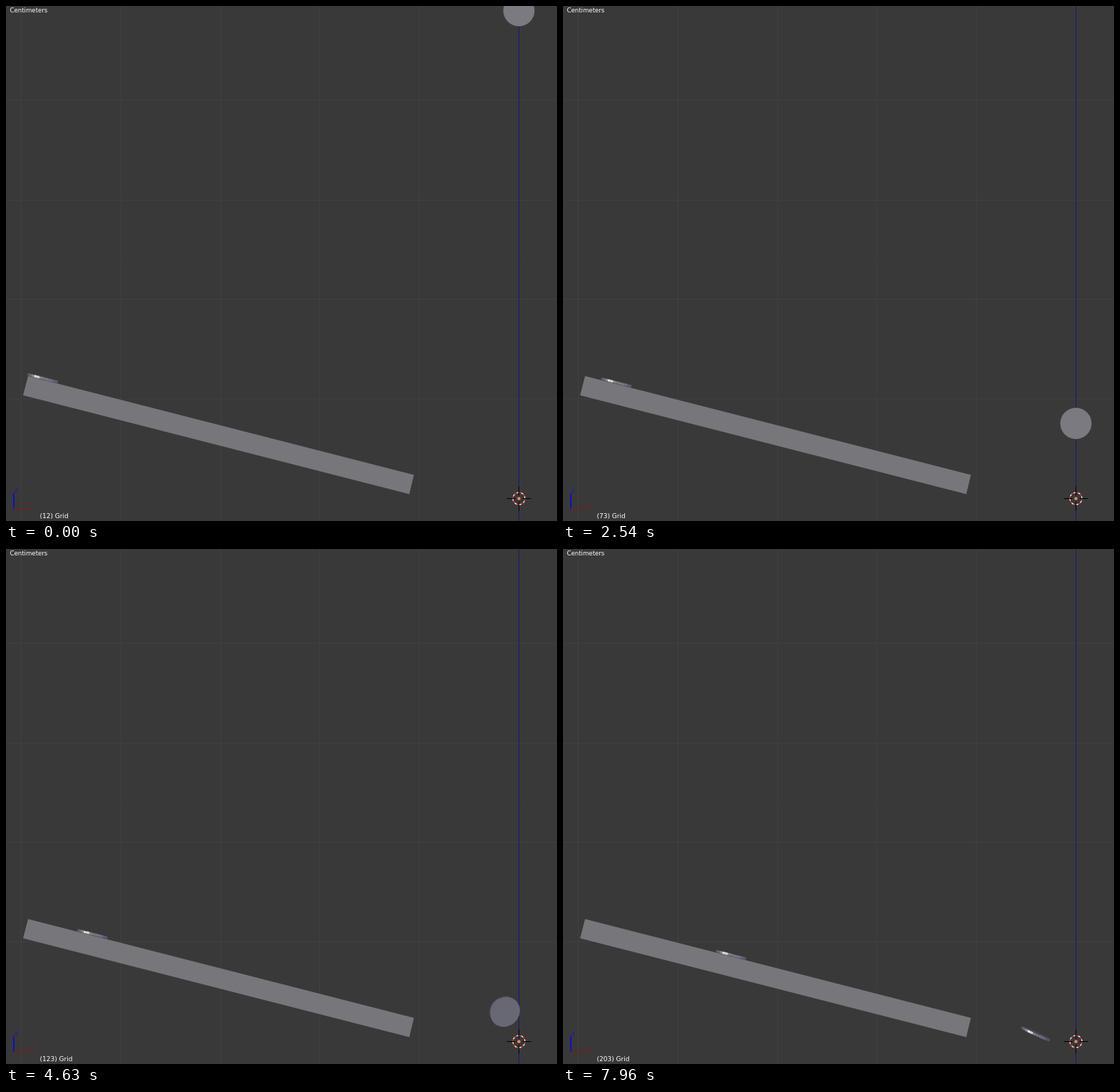
These frames come from a looping animation (774x723 px, 8 s). An HTML page with a canvas:

```html
<!DOCTYPE html>
<html lang="en">
<head>
<meta charset="utf-8">
<title>Falling coin</title>
<style>
  html, body { margin: 0; width: 100%; height: 100%; overflow: hidden; background: #393939; }
  canvas { display: block; }
</style>
</head>
<body>
<canvas id="stage" width="774" height="723"></canvas>
<script>
const ctx = document.getElementById('stage').getContext('2d');
const LOOP = 8000, STEP = 1000 / 24, FIRST = 12;
const RADIUS = 22, THICK = 3.4, FLOOR = 690.7, SEGMENTS = 32;
const IMPACT = 78, SECOND_IMPACT = 128, ROLL = 142;

// Vectors are [right, up, toward the viewer].
const dot = (a, b) => a[0] * b[0] + a[1] * b[1] + a[2] * b[2];
const cross = (a, b) => [
  a[1] * b[2] - a[2] * b[1],
  a[2] * b[0] - a[0] * b[2],
  a[0] * b[1] - a[1] * b[0]
];
const scale = (a, k) => a.map(v => v * k);
const add = (...vs) => [0, 1, 2].map(i => vs.reduce((sum, v) => sum + v[i], 0));
const unit = a => scale(a, 1 / Math.hypot(...a));
const mix = (a, b, k) => a + (b - a) * k;
const clamp01 = v => Math.min(1, Math.max(0, v));

function lookup(keys, x, warp = v => v) {
  let i = 1;
  while (i < keys.length - 1 && x > keys[i][0]) i++;
  const [x0, y0] = keys[i - 1], [x1, y1] = keys[i];
  return mix(y0, y1, clamp01((warp(x) - warp(x0)) / (warp(x1) - warp(x0))));
}

const HALF = unit([-0.37, 0.125, 0.92]);
function shade(n) {
  const key = Math.max(0, dot(n, [-55, 40, 98]));
  const fill = Math.max(0, dot(n, [0.78, 0.1, 0.15]));
  const shine = 130 * Math.pow(Math.max(0, dot(n, HALF)), 40);
  const grey = Math.round(key + shine + fill * 130);
  return `rgb(${grey},${grey},${Math.round(key + shine + fill * 168)})`;
}

function polygon(points, color) {
  ctx.beginPath();
  points.forEach(p => ctx.lineTo(p[0], p[1]));
  ctx.closePath();
  ctx.fillStyle = color;
  ctx.fill();
}

function line(x1, y1, x2, y2, color, width = 1) {
  ctx.beginPath();
  ctx.moveTo(x1, y1);
  ctx.lineTo(x2, y2);
  ctx.strokeStyle = color;
  ctx.lineWidth = width;
  ctx.stroke();
}

function text(value, x, y, size, color = '#fff') {
  ctx.font = `${size}px "DejaVu Sans", sans-serif`;
  ctx.fillStyle = color;
  ctx.fillText(value, x, y);
}

function drawCoin(cx, cy, normal) {
  const n = normal[2] < 0 ? scale(normal, -1) : normal;
  const u = unit(cross(Math.abs(n[1]) > 0.9 ? [1, 0, 0] : [0, 1, 0], n));
  const v = cross(n, u);
  const radial = i => {
    const a = i / SEGMENTS * Math.PI * 2;
    return add(scale(u, Math.cos(a)), scale(v, Math.sin(a)));
  };
  const point = (i, side) => {
    const p = add(scale(radial(i), RADIUS), scale(n, side * THICK / 2));
    return [cx + p[0], cy - p[1]];
  };
  for (let i = 0; i < SEGMENTS; i++) {
    const side = radial(i + 0.5);
    if (side[2] > 0) {
      polygon([point(i, -1), point(i + 1, -1), point(i + 1, 1), point(i, 1)], shade(side));
    }
  }
  polygon(Array.from({ length: SEGMENTS }, (_, i) => point(i, 1)), shade(n));
}

// Airborne: the face normal wobbles around a fixed axis.
const AXIS = unit([0.523, 0.266, 0.81]);
const FRONT = [0, 0, 1];
function wobble(frame) {
  const a = 9 * (frame - IMPACT) * Math.PI / 180;
  const along = scale(AXIS, dot(AXIS, FRONT));
  return unit(add(
    along,
    scale(add(FRONT, scale(along, -1)), Math.cos(a)),
    scale(cross(AXIS, FRONT), Math.sin(a))
  ));
}

// Grounded: the tilted coin rolls around the vertical.
const TILT = [[128, 0.7], [142, 0.68], [179, 0.6], [203, 0.42]];
function roll(frame) {
  const a = (216 + 2.25 * (frame - ROLL)) * Math.PI / 180;
  const s = lookup(TILT, frame);
  return [s * Math.cos(a), Math.sqrt(1 - s * s), -s * Math.sin(a)];
}

const COIN_X = [[78, 720.5], [105, 708.5], [128, 698.3], [142, 688],
  [152, 682.5], [172, 668.7], [179, 667], [203, 664]];

function fallingCoin(frame) {
  if (frame <= IMPACT) {
    return [720.5, -11.5 + 0.1097 * (frame + 0.8) ** 2, FRONT];
  }
  const x = lookup(COIN_X, frame);
  const landed = clamp01((frame - SECOND_IMPACT) / 5);
  const n = unit(add(scale(wobble(frame), 1 - landed), scale(roll(frame), landed)));
  const rest = FLOOR - RADIUS * Math.sqrt(1 - n[1] * n[1]) - Math.abs(n[1]) * THICK / 2 + 0.6;
  if (frame < SECOND_IMPACT) {
    const age = frame - IMPACT;
    return [x, Math.min(rest, 669 - 5.37 * age + 0.1097 * age * age), n];
  }
  const hop = clamp01((frame - SECOND_IMPACT) / (ROLL - SECOND_IMPACT));
  return [x, rest - 16 * hop * (1 - hop), n];
}

const SLIDE = [[12, 29.6], [57, 43], [73, 53], [105, 80], [142, 123], [179, 176], [203, 214]];
const SLOPE = 0.2563;
const RAMP_NORMAL = unit([SLOPE, 1, 0.001]);

function drawBackground() {
  ctx.fillStyle = '#393939';
  ctx.fillRect(0, 0, 774, 723);
  for (const x of [21, 161, 301, 440, 580]) line(x + 0.5, 0, x + 0.5, 723, '#404040');
  for (const y of [132, 272, 411, 551]) line(0, y + 0.5, 774, y + 0.5, '#404040');
  line(720.5, 0, 720.5, 723, '#18187c');
}

function drawCursor() {
  const x = 720.5, y = 691.5;
  ctx.lineWidth = 1.2;
  for (let i = 0; i < 16; i++) {
    ctx.beginPath();
    ctx.arc(x, y, 8.5, i * Math.PI / 8, (i + 1) * Math.PI / 8);
    ctx.strokeStyle = i % 2 ? '#fff' : '#f22';
    ctx.stroke();
  }
  for (const d of [-1, 1]) {
    line(x + 5 * d, y, x + 17 * d, y, '#000');
    line(x, y + 5 * d, x, y + 17 * d, '#000');
  }
  ctx.beginPath();
  ctx.arc(x, y, 2.2, 0, Math.PI * 2);
  ctx.fillStyle = '#f08a4a';
  ctx.fill();
}

function drawOverlay(frame) {
  drawCursor();
  line(11, 706, 11, 684, '#1010c0', 2);
  line(11, 705.5, 33, 705.5, '#8c1515');
  text('z', 12, 683, 9, '#1616c8');
  text('x', 33.5, 704, 9, '#8c1515');
  text('Centimeters', 5.5, 9, 8.6);
  text(`(${frame}) Grid`, 47.5, 718.7, 9);
}

function draw(now) {
  const frame = FIRST + Math.floor(((now % LOOP) + 5) / STEP);
  drawBackground();
  const left = lookup(SLIDE, Math.min(frame, 203), f => f * f);
  const slideX = left + 21.8;
  polygon([[31, 519.5], [573, 658.3], [566.5, 685.3], [24, 546.5]], '#77767b');
  drawCoin(slideX, 517.2 + (slideX - 31) * SLOPE, RAMP_NORMAL);
  drawCoin(...fallingCoin(Math.min(frame, 203)));
  drawOverlay(Math.min(frame, 203));
}

const start = performance.now();
function tick() {
  draw(performance.now() - start);
  requestAnimationFrame(tick);
}
tick();
</script>
</body>
</html>
```
